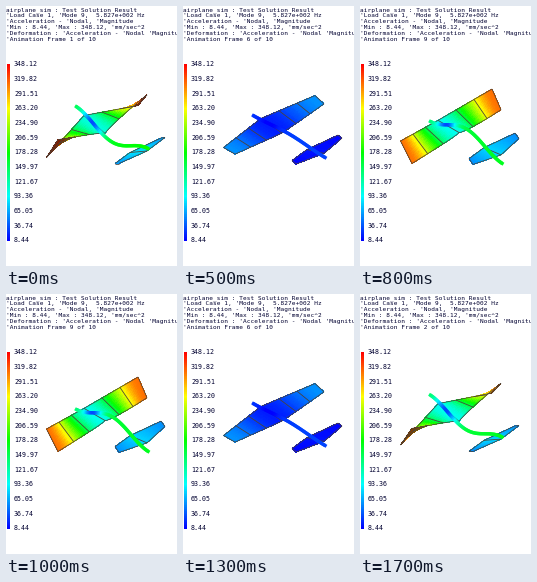
These frames come from a looping animation (171x260 px, 1800 ms). A matplotlib script:

```python
import numpy as np
import matplotlib.pyplot as plt
from matplotlib.animation import FuncAnimation
from matplotlib.collections import LineCollection, PolyCollection
from matplotlib.colors import LinearSegmentedColormap

W, H, DPI = 171, 260, 100
PX = 72 / DPI
LOW, HIGH = 8.4355, 348.1249
STEPS = 10
EDGE, INK = "#4a4238", "#000030"

cmap = LinearSegmentedColormap.from_list(
    "stress", ["#0000ff", "#00ffff", "#00ff00", "#ffff00", "#ff0000"])


def colour(value):
    return cmap(np.clip((value - LOW) / (HIGH - LOW), 0, 1))


def edge(left, root, right, swing):
    """Edge bent at the root; s runs from -1 (left tip) to 1 (right tip)."""
    def points(s, d):
        x, y = (np.interp(s, [-1, 0, 1], v) for v in zip(left, root, right))
        return np.column_stack([x, y + d * swing(s)])
    return points


def wing_magnitude(s):
    return 105 + 225 * s * s * (3 - 2 * s)


class Surface:
    """A lifting surface shaded by its magnitude along the span."""

    def __init__(self, ax, lead, trail, ribs, magnitude, z):
        self.lead, self.trail, self.magnitude = lead, trail, magnitude
        self.ribs = np.linspace(-1, 1, ribs)
        self.skin = PolyCollection([], antialiased=False, linewidths=0, zorder=z)
        self.wire = LineCollection([], colors=EDGE, linewidths=0.8 * PX, zorder=z + 1)
        ax.add_collection(self.skin)
        ax.add_collection(self.wire)

    def update(self, d):
        s = np.linspace(-1, 1, 73)
        a, b = self.lead(s, d), self.trail(s, d)
        c = np.linspace(0, 1, 9)[:, None, None]
        grid = a + c * (b - a)
        quads = np.stack([grid[:-1, :-1], grid[:-1, 1:], grid[1:, 1:], grid[1:, :-1]],
                         axis=2).reshape(-1, 4, 2)
        mid = (s[:-1] + s[1:]) / 2
        rgba = np.tile(colour(abs(d) * self.magnitude(np.abs(mid))), (8, 1))
        # Quads seen from below wind the other way and are darker
        p, q = quads[:, 2] - quads[:, 0], quads[:, 3] - quads[:, 1]
        under = p[:, 0] * q[:, 1] - p[:, 1] * q[:, 0] < 0
        rgba[under, :3] *= 0.5
        self.skin.set_verts(quads)
        self.skin.set_facecolor(rgba)
        ribs = np.stack([self.lead(self.ribs, d), self.trail(self.ribs, d)], axis=1)
        self.wire.set_segments([a, b, *ribs])


fig = plt.figure(figsize=(W / DPI, H / DPI), dpi=DPI, facecolor="white")
ax = fig.add_axes([0, 0, 1, 1])
ax.axis("off")


def label(x, y, text, size=6.2):
    return ax.text(x, y, text, family="DejaVu Sans Mono", fontsize=size * PX,
                   va="baseline", color=INK)


header = [
    "airplane_sim : Test Solution Result",
    "'Load Case 1, 'Mode 9,  5.827e+002 Hz",
    "'Acceleration - 'Nodal, 'Magnitude",
    "'Min : 8.44, 'Max : 348.12, 'mm/sec^2",
    "'Deformation : 'Acceleration - 'Nodal 'Magnitude",
]
for row, line in enumerate(header):
    label(0.5, 5 + 6 * row, line)
counter = label(0.5, 35, "")

ax.imshow(np.linspace(1, 0, 256)[:, None], cmap=cmap, aspect="auto",
          extent=(1, 4, 235, 58), interpolation="bilinear")
ax.set_xlim(0, W)
ax.set_ylim(H, 0)
for k, value in enumerate(np.linspace(HIGH, LOW, 13)):
    label(8, 60.5 + 14.65 * k, f"{value:.2f}", 6.6)

wing = Surface(
    ax,
    edge((40.5, 143), (78, 112), (132, 91), lambda s: 11 * np.abs(s) - 2.5),
    edge((52, 146), (99, 127), (141, 96.5),
         lambda s: 0.5 - 10.5 * np.abs(s) ** 0.7 * (1 - 0.22 * s)),
    7, wing_magnitude, 4)
tail = Surface(
    ax,
    edge((109, 155), (124, 144), (155, 129.5), lambda s: 2.5 + 0 * s),
    edge((113, 158), (141, 147), (159, 132), lambda s: 1.5 * np.abs(s) - 2),
    3, lambda s: 85 - 25 * s, 2)
rod = LineCollection([], linewidths=3.4 * PX, zorder=6, capstyle="butt")
ax.add_collection(rod)

u = np.linspace(0, 1, 61)
bend = -7.3 * np.cos(2 * np.pi * u) - 0.4
rod_magnitude = 30 + 20 * u + 130 * (1 - np.exp(-((u - 0.24) / 0.14) ** 2))


def draw(i):
    n = i if i < STEPS else 2 * (STEPS - 1) - i
    d = np.cos(np.pi * n / (STEPS - 1))
    counter.set_text(f"'Animation Frame {n + 1} of {STEPS}")
    wing.update(d)
    tail.update(d)
    path = np.column_stack([69 + 74.5 * u, 107.5 + 43.5 * u + d * bend])
    rod.set_segments([path[k:k + 3] for k in range(len(u) - 2)])
    rod.set_color(colour(abs(d) * rod_magnitude[1:-1]))
    return wing.skin, wing.wire, tail.skin, tail.wire, rod, counter


anim = FuncAnimation(fig, draw, frames=2 * (STEPS - 1), interval=100,
                     repeat=True, repeat_delay=0)
plt.show()
```
